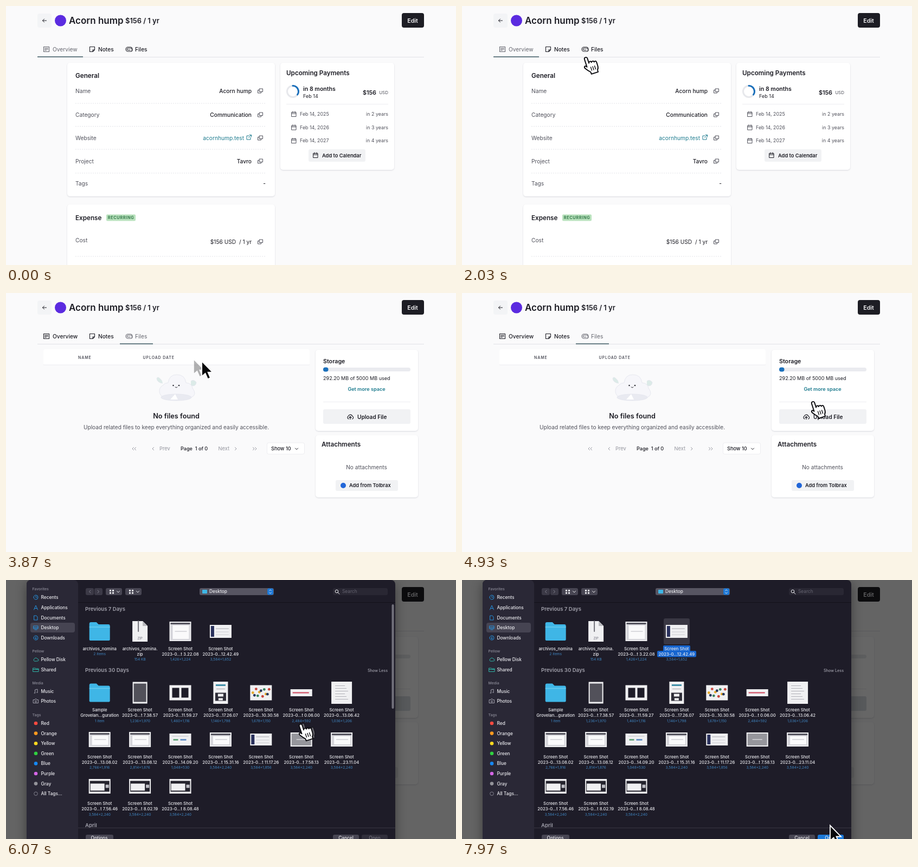
Animation of 830x479 px, one loop 8 s. Source, as an HTML page:

```html
<!DOCTYPE html>
<html lang="en">
<head>
<meta charset="utf-8">
<title>Upload a file</title>
<style>
  html, body { margin: 0; height: 100%; overflow: hidden; background: #fafafb; }
  svg { display: block; width: 100vw; height: 100vh; font-family: Inter, sans-serif; }
  text { white-space: pre; }
  .card { fill: #fff; filter: drop-shadow(0 1px 1px #d8d9de); }
  #dialog { filter: drop-shadow(0 6px 10px #0006); }
</style>
</head>
<body>
<svg id="stage" viewBox="0 0 830 479"></svg>
<script>
const INK = '#1c1c24', SOFT = '#50515b', LINE = '#ededf0', BUTTON = '#f1f2f4', TEAL = '#1d7b8e', BLUE = '#1b70bb';

// Drawing helpers: each returns markup; text is centred vertically on y.
const text = (x, y, str, size = 10.2, weight = 400, fill = INK, anchor = 'start', extra = '') =>
  `<text x="${x}" y="${y + size * .36}" font-size="${size}" font-weight="${weight}" fill="${fill}" text-anchor="${anchor}" ${extra}>${str}</text>`;
const rect = (x, y, w, h, fill, r = 0, extra = '') =>
  `<rect x="${x}" y="${y}" width="${w}" height="${h}" rx="${r}" fill="${fill}" ${extra}/>`;
const card = (x, y, w, h) => rect(x, y, w, h, '#fff', 5, 'class="card"');
const dot = (x, y, r, fill, extra = '') => `<circle cx="${x}" cy="${y}" r="${r}" fill="${fill}" ${extra}/>`;
const icon = (x, y, d, stroke = SOFT, width = 1) =>
  `<path transform="translate(${x} ${y})" d="${d}" fill="none" stroke="${stroke}" stroke-width="${width}" stroke-linecap="round" stroke-linejoin="round"/>`;
const rule = (x1, x2, y, stroke = LINE, width = 1, dash = '') =>
  `<path d="M${x1} ${y}H${x2}" stroke="${stroke}" stroke-width="${width}" stroke-dasharray="${dash}"/>`;
const group = (id, content) => `<g id="${id}">${content}</g>`;

const ICON = {
  back: 'M3.5 0H-3.5M-.5-3L-3.5 0L-.5 3',
  overview: 'M-5-4.5H5V4.5H-5ZM-3-2H3M-3 0H3M-3 2H0',
  note: 'M-4.5-4.5H4.5V1L1 4.5H-4.5ZM4.5 1H1V4.5',
  clip: 'M3-4H-2A3.5 3.5 0 0 0-2 4H3A2.5 2.5 0 0 0 3-2H-2A1.5 1.5 0 0 0-2 1.5H2M3-4A3 3 0 0 1 5 1',
  copy: 'M-1.5-4H4.5V1.5H-1.5ZM-1.5-1.5H-4.5V4H1.5V1.5',
  external: 'M0-3H-4V4H3V0M1-4.5H4.5V-1M4.5-4.5L-.5 .5',
  calendar: 'M-4-3.5H4V4.5H-4ZM-4-1H4M-2-5V-2.5M2-5V-2.5',
  cloud: 'M-3 4A3 3 0 0 1-3.5-1.5A4 4 0 0 1 4-1A2.6 2.6 0 0 1 3.5 4M0 4.5V-.5M-2 1.5L0-.5L2 1.5',
  down: 'M-2.5-1L0 1.5L2.5-1', left: 'M1.5-2.5L-1 0L1.5 2.5', right: 'M-1.5-2.5L1 0L-1.5 2.5'
};

const header = rect(58, 14, 26, 26, '#f3f4f6', 4) + icon(71, 27, ICON.back, INK) + dot(100.5, 27, 10.5, '#5b2be0') +
  text(116, 27, 'Acorn hump', 17, 600) + text(220, 27, '$156 / 1 yr', 12.9, 600) +
  rect(730, 13, 41, 27, '#1d1d24', 4) + text(750, 27, 'Edit', 10.6, 600, '#f2f2f4', 'middle') +
  rule(58, 771, 94.5, '#e1e2e7');

const tabs = active => [['Overview', 74.5, 86, 58, 142, ICON.overview], ['Notes', 159, 170, 143, 209, ICON.note], ['Files', 227, 238, 210, 271, ICON.clip]]
  .map(([label, iconX, x, from, to, d]) => {
    const on = label === active, color = on ? '#64656e' : INK;
    return icon(iconX, 80, d, color, 1.1) + text(x, 80, label, 10.2, on ? 400 : 500, color) +
      (on ? rule(from, to, 94, '#3d5862', 1.7) : '');
  }).join('');

const field = (y, label, value) => text(128, y, label, 10.2, 400, SOFT) +
  text(453, y, value, 10.2, 500, INK, 'end') + icon(469, y, ICON.copy);

const overviewPage = tabs('Overview') + card(113, 105, 383, 247) + card(113, 367, 383, 130) + card(506, 105, 210, 198) +
  text(128, 129, 'General', 11.7, 600) + field(157, 'Name', 'Acorn hump') + field(201, 'Category', 'Communication') +
  field(244, 'Website', '') + text(439, 244, 'acornhump.test', 10.2, 400, TEAL, 'end') + icon(448, 243, ICON.external, TEAL) +
  field(287, 'Project', 'Tavro') + text(128, 328, 'Tags', 10.2, 400, SOFT) + text(479, 328, '-', 10.2, 500, INK, 'end') +
  [180, 222.5, 265, 309, 463].map(y => rule(128, 480, y, '#e2e3e8', 1, '2 2')).join('') +
  text(128, 391.5, 'Expense', 11.7, 600) + rect(185, 385.5, 54, 12, '#b9e2bd', 2) +
  text(212, 391.5, 'RECURRING', 7.4, 700, '#357a4b', 'middle', 'letter-spacing=".6"') +
  text(128, 433, 'Cost', 10.2, 400, SOFT) + text(453, 436, '$156 USD  / 1 yr', 10.2, 400, INK, 'end') + icon(469, 436, ICON.copy) +
  text(517, 124, 'Upcoming Payments', 11.7, 600) +
  dot(529, 158, 10.5, 'none', 'stroke="#e7e8ec" stroke-width="3"') + icon(529, 158, 'M0-10.5A10.5 10.5 0 0 1 8.5 6', BLUE, 3) +
  text(548, 153, 'in 8 months', 10.6, 600) + text(548, 167, 'Feb 14', 9) +
  text(683, 160, '$156', 10.8, 600, INK, 'end') + text(705, 160.5, 'USD', 8, 400, SOFT, 'end') + rule(517, 705, 181.5) +
  [2025, 2026, 2027].map((year, i) => {
    const y = 200 + i * 24.6;
    return icon(531, y, ICON.calendar) + text(542, y, 'Feb 14, ' + year, 8.9, 400, SOFT) +
      text(705, y, `in ${i + 2} years`, 8.9, 400, SOFT, 'end');
  }).join('') +
  rect(558, 265, 105, 23, BUTTON, 3) + icon(571, 276, ICON.calendar, INK) + text(583, 276.5, 'Add to Calendar', 9.3, 600);

const mascot = `<g stroke="#e3e4ec" stroke-width=".8">
  <path d="M288 163q-8-11-10-5q1 8 11 9M341 163q5-4 10 2q-1 9-10 6" fill="#dcebe8"/>
  <path d="M292 193a12 12 0 0 1-3-22q4-5 10-5q2-15 16-15q15 0 17 15q11 1 12 10q9 12-2 17z" fill="#f6f6fa"/>
  <ellipse cx="314" cy="193" rx="28" ry="6" fill="#e9eaf1"/></g>
  <path d="M303 197l9-10 5 10z" fill="#fff"/>` +
  dot(308.5, 171, 1.2, INK) + dot(319, 171, 1.2, INK) + icon(314, 174, 'M-2 0Q0 2.5 2 0', INK, .9);
const caps = 'letter-spacing=".9"', FAINT = '#94959e';

const filesPage = tabs('Files') + rect(69, 104, 491, 29, '#fff', 4) + rule(69, 560, 133) +
  text(133, 119, 'NAME', 7, 600, SOFT, 'start', caps) + text(252.5, 119, 'UPLOAD DATE', 7, 600, SOFT, 'start', caps) + mascot +
  text(314, 227, 'No files found', 12.7, 600, INK, 'middle') +
  text(314, 248, 'Upload related files to keep everything organized and easily accessible.', 10.1, 400, SOFT, 'middle') +
  [234, 238, 271].map(x => icon(x, 288, ICON.left, FAINT)).join('') + [424, 457, 461].map(x => icon(x, 288, ICON.right, FAINT)).join('') +
  text(283, 288, 'Prev', 9.3, 400, FAINT) + text(322, 288, 'Page  1 of 0', 9.1, 500) + text(391.5, 288, 'Next', 9.3, 400, FAINT) +
  rect(481.5, 277, 69, 21, '#fff', 3, `stroke="${LINE}"`) + text(489, 288, 'Show 10', 9.2, 500) + icon(536, 288, ICON.down, INK) +
  card(571, 105, 189, 150) + card(571, 263, 189, 115) + text(585, 126, 'Storage', 10.7, 600) +
  rect(585, 138, 161, 7, '#eaebef', 3.5) + rect(585, 137.5, 9.5, 8, BLUE, 4) + text(585, 158, '292.20 MB of 5000 MB used', 9.05) +
  text(665, 178, 'Get more space', 9.1, 600, TEAL, 'middle') + rule(585, 746, 201.5) +
  rect(585, 215, 161, 27, BUTTON, 3, 'id="upload"') + icon(635, 229, ICON.cloud, INK, 1.2) + text(648, 229, 'Upload File', 10.1, 600) +
  text(582, 280, 'Attachments', 11.7, 600) + text(665, 322, 'No attachments', 10.1, 400, SOFT, 'middle') +
  rect(608, 346, 115, 20, BUTTON, 3) + dot(622, 356, 5, '#2166d8') + text(633, 356, 'Add from Tolbrax', 9.2, 600);

// File dialog
const PALE = '#ececf0', DIM = '#83828f', SKY = '#3fb6e6', PAPER = '#f0f0f2', DARK = '#1e1c28';

const sideHeads = [['Favorites', 17], ['Pellow', 132], ['Media', 191], ['Tags', 250]];
const sideItems = [['Recents', 32], ['Applications', 51], ['Documents', 70], ['Desktop', 88], ['Downloads', 107],
  ['Pellow Disk', 147], ['Shared', 166], ['Music', 206], ['Photos', 224]];
const sideIcons = ['M-4 0A4 4 0 1 0 4 0A4 4 0 1 0-4 0M0-2V0H2', 'M-3.5 4L0-4L3.5 4M-2 1.5H2', 'M-3-4H1L3-2V4H-3Z', 'M-4-3H4V2H-4ZM-4 0H4M-2 4H2',
  'M-4 0A4 4 0 1 0 4 0A4 4 0 1 0-4 0M0-2V2M-1.5 .5L0 2L1.5 .5', 'M-3 3A2.5 2.5 0 0 1-3-1A3.3 3.3 0 0 1 3-1A2 2 0 0 1 3 3Z', 'M-5-3H-1L0-2H5V3.5H-5ZM-5-.5H5',
  'M-1.5 3V-3L3-4V2M-1.5 3H-3M3 2H1.5', 'M-4.5-2.5H-2L-1-4H1L2-2.5H4.5V3.5H-4.5ZM-1.5 .5A1.5 1.5 0 1 0 1.5 .5A1.5 1.5 0 1 0-1.5 .5'];
const tags = [['Red', '#ff4a40'], ['Orange', '#ff9a1f'], ['Yellow', '#ffd91f'], ['Green', '#30d140'], ['Blue', '#1688f5'],
  ['Purple', '#d565e6'], ['Gray', '#94949a'], ['All Tags…', 'none']];

const sidebar = rect(38, 0, 95, 498, '#2a2836', 8) + rect(45, 79, 82, 18, '#464452', 4) +
  sideHeads.map(([label, y]) => text(48.5, y, label, 6.8, 600, DIM)).join('') +
  sideItems.map(([label, y], i) => icon(55, y, sideIcons[i], i > 6 ? '#a2a1ad' : i > 4 ? '#2fb5a8' : '#2590dc') + text(64.5, y, label, 8.3, 500, PALE)).join('') +
  tags.map(([label, color], i) => {
    const y = 265 + i * 18.6;
    return dot(55, y, 3.3, color, i === 7 ? `stroke="${DIM}"` : '') + text(64.5, y, label, 8.3, 500, PALE);
  }).join('');

const pill = (x, y, w, h, fill = '#484653') => rect(x, y, w, h, fill, 3);
const toolbar = pill(147, 15, 15, 13, '#3b3946') + pill(163, 15, 15, 13, '#3b3946') + icon(154.5, 21.5, ICON.left, DIM) + icon(170.5, 21.5, ICON.right, DIM) +
  [184, 220].map(x => pill(x, 15, 30, 13) + [0, 1, 2, 3].map(i => rect(x + 7 + i % 2 * 5, 18 + (i >> 1) * 4.5, 3, 3, PALE)).join('') +
    icon(x + 23, 21.5, ICON.down, PALE)).join('') +
  pill(357, 15, 137, 13, '#575562') + rect(362, 18, 9, 7, SKY, 1) + text(375, 21.5, 'Desktop', 8.3, 500, PALE) +
  pill(482, 15.5, 11, 12, '#1b78d8') + icon(487.5, 21.5, 'M-2-1.5L0-3.5L2-1.5M-2 1.5L0 3.5L2 1.5', PALE) +
  pill(603, 15, 101, 13, '#292733') + dot(610, 21, 2.8, 'none', `stroke="${PALE}"`) + icon(612, 23, 'M0 0L3 3', PALE) +
  text(620, 21.5, 'Search', 8.3, 400, '#666572') + rule(133, 718, 41.5, '#12111a');

const COLS = i => 172.7 + i * 74.4;
const thumbs = {
  folder: () => `<path d="M-19 15V-14q0-3 3-3h10l4 4h18q3 0 3 3v25q0 2-3 2H-16q-3 0-3-2z" fill="${SKY}"/>` + rule(-19, 19, -8, '#6accee', 1.5),
  zip: () => `<path d="M-14-19H5L14-10V19H-14Z" fill="${PAPER}"/><path d="M5-19V-10H14Z" fill="#b9b9be"/>` +
    rule(-3, -3, 0) + icon(-3, -19, 'M0 0V19', '#72727a', 2) + text(0, 13, 'ZIP', 6, 500, DIM, 'middle'),
  window: (w, h) => rect(-w / 2 + 2, -h / 2 + 2, w - 4, 3, '#55545f') + rect(-w / 2 + 2, -h / 2 + 5, w - 4, h - 7, '#d5d5da') +
    rect(-w / 2 + 6, -h / 2 + 7, w - 10, h - 11, '#fafafb') + rule(-10, 12, 0, '#b9b9c0'),
  bar: (w, h) => rect(-w / 2 + 2, -h / 2 + 2, 6, h - 4, '#29305c') + rule(-9, 15, -5, '#a6a6ad') + rule(-9, 15, 1, '#cbcbd0') + rule(-9, 15, 6, '#cbcbd0'),
  phone: (w, h) => rect(-w / 2 + 2, -h / 2 + 3, w - 4, h - 6, '#52515a'),
  pair: () => rect(-15, -9, 13, 18, DARK) + rect(2, -9, 13, 18, DARK),
  mixed: () => rule(-9, 9, -14, '#3f8fa8', 3) + rule(-8, 8, -7, '#a3a3a9') + rect(-10, 0, 20, 15, '#2e2d38') + rect(-5, 2, 10, 5, PAPER) + rect(-4, 10, 8, 4, PAPER),
  dots: () => Array.from({ length: 11 }, (_, i) => dot(-15 + i * 3, 7 * Math.sin(i * 2.4), 2.4, ['#e5a82c', '#28385c', '#c8453c', '#39835c'][i % 4])).join(''),
  red: () => rule(-16, 14, 0, '#cd4158', 2),
  list: () => [-13, -8, -3, 2, 7, 12].map((y, i) => rule(-12, 6 + i % 3 * 3, y, '#b1b1b8')).join(''),
  strip: () => rule(-15, 15, -6, '#c1c1c7') + rect(-13, -1, 9, 3, '#69a880') + rect(0, -1, 11, 3, '#6a94c8'),
  grey: (w, h) => rect(-w / 2 + 2, -h / 2 + 2, w - 4, h - 4, '#96969c') + rule(-9, 9, 0, PAPER),
  dark: () => rect(-18, -10, 36, 20, '#24232d') + rect(-17, -5, 26, 13, PAPER) + rect(11, -3, 6, 6, '#bfbfc6')
};
const shot = (kind, w, h, stamp, size) => [kind, w, h, 'Screen Shot', '2023-0…' + stamp, size];
const BIG = '3,584×2,240';
const rows = [
  [95, [['folder', 0, 0, 'archivos_nomina', '', '2 items'], ['zip', 0, 0, 'archivos_nomina.', 'zip', '154 KB'],
    shot('window', 40, 36, 't 3.22.08', '1,426×1,224'), shot('bar', 40, 24, '12.42.49', '3,584×1,652')]],
  [208.5, [['folder', 0, 0, 'Sample', 'Grovelan…guration', '1 item'], shot('phone', 27, 40, 't 7.38.57', '1,236×1,970'),
    shot('pair', 40, 28, '11.59.27', '1,460×1,116'), shot('mixed', 27, 41, '17.26.07', '1,146×1,798'), shot('dots', 40, 28, '10.30.58', '1,678×1,150'),
    shot('red', 40, 13, 't 0.06.00', '2,484×592'), shot('list', 38, 41, '13.06.42', '1,036×1,206')]],
  [295, [shot('window', 40, 28, '13.08.02', '2,766×1,916'), shot('window', 40, 28, '13.08.12', '2,814×1,876'), shot('strip', 40, 22, '14.09.20', '1,048×530'),
    shot('window', 40, 26, 't 15.31.16', BIG), shot('bar', 40, 22, 't 11.17.26', '3,584×1,856'), shot('grey', 40, 26, 't 7.58.13', BIG), shot('window', 40, 26, '23.11.04', BIG)]],
  [381.5, ['t 7.56.46', 't 8.02.19', 't 8.08.48'].map(stamp => shot('dark', 40, 27, stamp, BIG))]
];
const files = rows.map(([y, items]) => items.map(([kind, w, h, name, rest, size], i) =>
  `<g transform="translate(${COLS(i)} ${y})">` + (w ? rect(-w / 2, -h / 2, w, h, PAPER) : '') + thumbs[kind](w, h) +
  text(0, 31.8, name, 7.75, 500, PALE, 'middle') + text(0, 42.2, rest, 7.75, 500, PALE, 'middle') +
  text(0, rest ? 51.7 : 41.5, size, 6.6, 400, '#3f86c2', 'middle') + '</g>').join('')).join('');

const dialog = rect(38, 0, 680, 498, DARK, 8) + sidebar + toolbar +
  [['Previous 7 Days', 54], ['Previous 30 Days', 167], ['April', 454]].map(([label, y]) => text(146, y, label, 9.6, 600, '#a1a0ab')).join('') +
  text(704, 167, 'Show Less', 7.2, 500, '#a1a0ab', 'end') +
  group('selection', rect(372, 71, 48, 48, '#393743', 3) + rect(371, 121, 50, 11, '#1766d0', 2) + rect(360, 131, 72, 11.5, '#1766d0', 2)) +
  files + rect(711.5, 45, 4, 193, '#72717c', 2, 'id="scrollbar"') + rule(133, 718, 458.5, '#393743') +
  pill(147, 471, 51, 14) + text(172, 477.5, 'Options', 8.3, 500, PALE, 'middle') +
  pill(603, 471, 48, 14) + text(627, 477.5, 'Cancel', 8.3, 500, PALE, 'middle') +
  rect(656, 471, 48, 14, '#312f3b', 3, 'id="open"') + text(680, 477.5, 'Open', 8.3, 500, '#757481', 'middle', 'id="openLabel"');

const cursorShapes =
  `<path class="arrow" d="M0 0V28L6.5 22.5L11 33L16 31L11.5 20.5H20Z" fill="#08080a" stroke="#fff" stroke-width="1.8"/>
  <g class="hand" transform="rotate(-18) scale(.93)"><path d="M-3 2Q-3-1 0-1Q3-1 3 2V12Q3 9.5 6 9.5Q8.5 9.5 8.5 12Q9 10.5 11.5 10.5Q13.5 10.5 13.5 13Q14 12 16 12Q18 12 18 15V22Q18 27 15 30V34H1V30Q-3 26-7 20Q-9 17-7 15.5Q-5 14.5-3 18Z"
  fill="#fff" stroke="#0c0c10" stroke-width="2" stroke-linejoin="round"/><path d="M4 20V28M8 20V28M12 20V28" stroke="#0c0c10" stroke-width="1.5"/></g>`;

const stage = document.getElementById('stage');
stage.innerHTML = header + group('overview', overviewPage) + group('files', filesPage) +
  rect(0, 0, 830, 479, '#000', 0, 'id="shade"') + group('dialog', dialog) +
  group('trail', cursorShapes) + group('cursor', cursorShapes);
const el = id => document.getElementById(id);
const show = (node, visible) => node.style.display = visible ? '' : 'none';
const clamp = v => Math.min(1, Math.max(0, v));

// Pointer stops: time in ms, x, y
const stops = [[900, 300, 500], [1300, 164, 250], [1900, 228, 96], [2500, 228, 96], [2830, 216, 88], [3250, 217, 88], [4850, 647, 202], [5000, 647, 202],
  [5300, 656, 224], [5580, 655, 226], [6100, 542, 268], [6850, 394, 96], [7200, 394, 96], [7900, 679, 454], [8000, 679, 454]];
function pointer(t) {
  const next = stops.findIndex(stop => stop[0] > t);
  if (next < 1) return stops[0].slice(1);
  const [t0, x0, y0] = stops[next - 1], [t1, x1, y1] = stops[next];
  const u = (t - t0) / (t1 - t0), s = u * u * (3 - 2 * u);
  return [x0 + (x1 - x0) * s, y0 + (y1 - y0) * s];
}

function draw() {
  const t = performance.now() % 8000;
  const opened = clamp((t - 5830) / 200), selected = t >= 7080;
  show(el('overview'), t < 3100);
  show(el('files'), t >= 3100);
  el('upload').setAttribute('fill', t > 5600 ? '#dbdfe5' : BUTTON);
  el('shade').setAttribute('opacity', opened * .6);
  show(el('dialog'), opened > 0);
  el('dialog').setAttribute('opacity', opened);
  el('dialog').setAttribute('transform', `translate(0 ${-32 * (1 - opened)})`);
  el('scrollbar').setAttribute('opacity', opened * clamp((6900 - t) / 200));
  show(el('selection'), selected);
  el('open').setAttribute('fill', selected ? '#1b78d8' : '#312f3b');
  el('openLabel').setAttribute('fill', selected ? PALE : '#757481');

  const hand = t > 1800 && t < 3400 || t > 4650 && t < 6150;
  const solid = opened > 0 && opened < 1 ? .5 : 1;
  for (const [id, lag, opacity] of [['trail', 40, .3], ['cursor', 0, 1]]) {
    const node = el(id);
    node.setAttribute('transform', `translate(${pointer(Math.max(0, t - lag))})`);
    node.setAttribute('opacity', opacity * solid);
    show(node.querySelector('.hand'), hand);
    show(node.querySelector('.arrow'), !hand);
  }
  requestAnimationFrame(draw);
}
draw();
</script>
</body>
</html>
```
